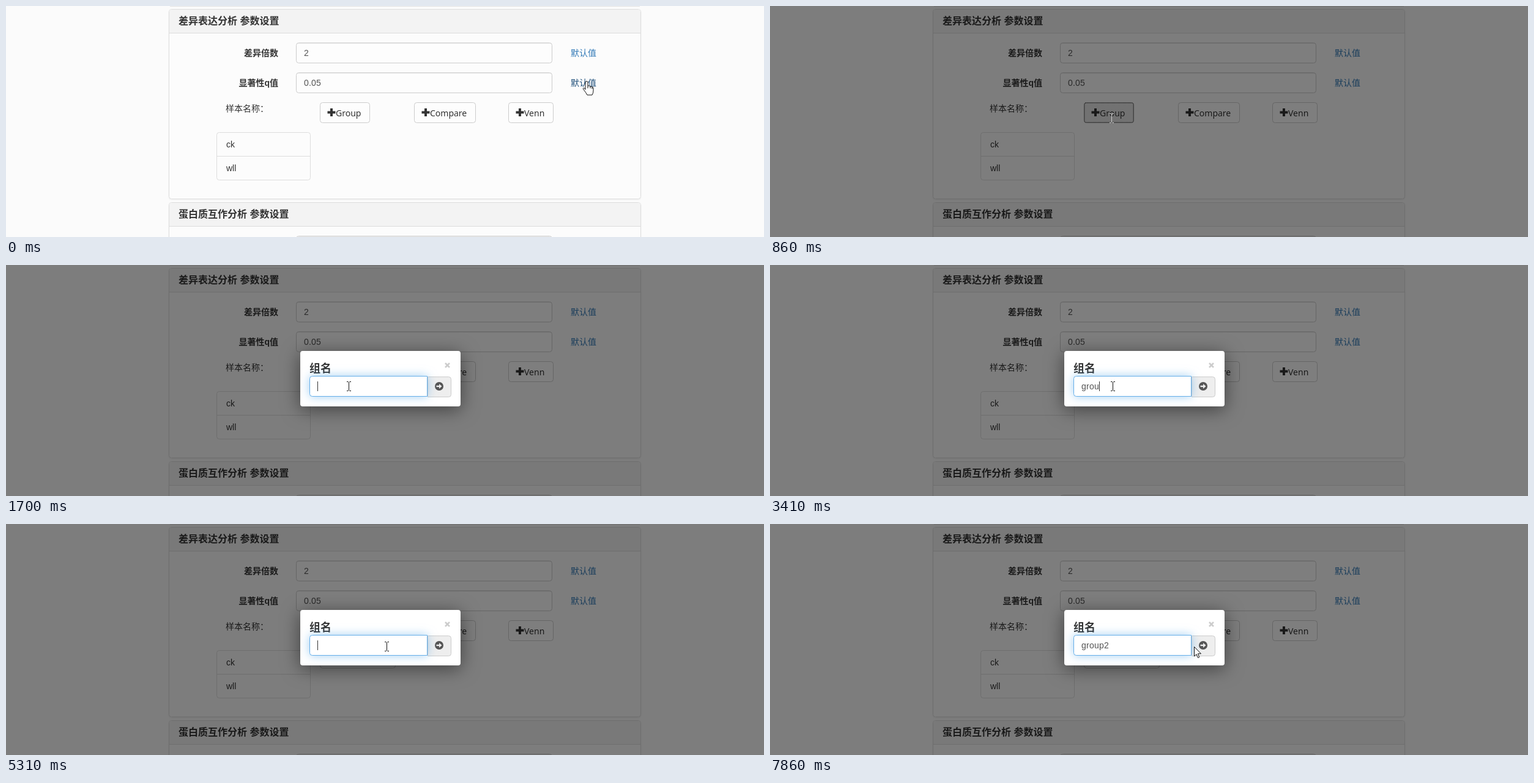
An HTML page that plays this animation: 1239 by 379 pixels, repeating every 8 s.

```html
<!DOCTYPE html>
<html lang="zh-CN">
<head>
<meta charset="utf-8">
<title>参数设置</title>
<style>
  html, body { margin: 0; width: 100%; height: 100%; overflow: hidden; background: #fbfbfb; }
  svg { display: block; width: 100%; height: 100%; }
  text { font: 14px "Liberation Sans", "Noto Sans CJK SC", "Noto Sans CJK", sans-serif; fill: #333; white-space: pre; }
  .heading { font-size: 16px; font-weight: 700; }
  .label { font-weight: 700; text-anchor: end; }
  .link { fill: #337ab7; }
  .link.hover { fill: #23527c; }
  .value { fill: #555; letter-spacing: .22px; }
  .button text { font-family: "Noto Sans", sans-serif; }
  .button rect, .field { fill: #fdfdfd; stroke: #ccc; }
  .button path { stroke: #333; stroke-width: 4; }
  .button .focus { fill: none; stroke: none; }
  .button.hover .face { fill: #e6e6e6; stroke: #adadad; }
  .button.focused .focus { stroke: #222; stroke-dasharray: 1 1; }
  .button.pressed .face { fill: #d4d4d4; stroke: #8c8c8c; }
  .panel { fill: #fcfcfc; stroke: #ddd; filter: drop-shadow(0 1px 1px rgba(0,0,0,.05)); }
  .list { fill: none; stroke: #ddd; }
  #dialog .frame { fill: #fff; filter: drop-shadow(0 5px 15px rgba(0,0,0,.5)); }
  #dialog .title { font-size: 18px; font-weight: 700; }
  #entry { fill: #fff; stroke: #ccc; }
  #entry.focused { stroke: #66afe9; filter: drop-shadow(0 0 8px rgba(102,175,233,.6)); }
</style>
</head>
<body>
<svg viewBox="0 0 1239 379" preserveAspectRatio="none">
  <defs>
    <g id="hand" stroke="#111" fill="#fff" stroke-linejoin="round">
      <path d="M-2 14V2Q-2 .5 0 .5T2 2V8Q5 7.300 6 9Q8 8.300 9 10Q11 9.500 11 12V16Q11 20 9 23H1Q-1 19-5 14Q-6.500 12-5 11.500T-2 14Z"/>
      <path d="M2 8V12M6 9V12M9 10V13" fill="none"/>
    </g>
    <path id="arrow" d="M.5.5V16L4 12.600 6.500 18.500 8.800 17.500 6.400 11.800H11.500Z" fill="#fff" stroke="#111"/>
    <path id="beam" d="M-3-7.500H-.5M1.500-7.500H4M.5-7V7M-3 7.500H-.5M1.500 7.500H4" fill="none"/>
  </defs>

  <rect width="1239" height="379" fill="#fbfbfb"/>
  <path d="M268 .5H1036" stroke="#e2e2e2"/>
  <g id="page"></g>
  <g class="list">
    <rect x="344.500" y="207.500" width="153" height="78" rx="4"/>
    <path d="M345 246.500H497"/>
  </g>
  <text x="360" y="232">ck</text>
  <text x="360" y="271">wll</text>
  <rect id="groupBox" class="field" x="513.500" y="203.500" width="123" height="33" rx="4"/>
  <rect id="shade" width="1239" height="379" opacity=".5"/>

  <g id="dialog">
    <rect class="frame" x="481" y="141" width="262" height="91" rx="4"/>
    <text class="title" x="496" y="176">组名</text>
    <path d="M718 161L725 168M725 161L718 168" stroke="#ccc" stroke-width="2.600"/>
    <path d="M689.500 183.500H723.500Q727.500 183.500 727.500 187.500V212.500Q727.500 216.500 723.500 216.500H689.500Z" fill="#eee" stroke="#ccc"/>
    <circle cx="708" cy="199" r="7" fill="#555"/>
    <path d="M703.500 199H709" stroke="#eee" stroke-width="2.400"/>
    <path d="M708 195V203L712.500 199Z" fill="#eee"/>
    <path id="entry" d="M688.500 182.500H500.500Q496.500 182.500 496.500 186.500V211.500Q496.500 215.500 500.500 215.500H688.500Z"/>
    <text id="typed" class="value" x="509" y="204"></text>
    <rect id="caret" y="191" width="1" height="16" fill="#333"/>
  </g>
  <use id="cursor"/>
</svg>
<script>
const $ = id => document.getElementById(id);

const panel = (y, height, title) => `
  <rect class="panel" x="266.5" y="${y + .5}" width="771" height="${height}" rx="4"/>
  <path d="M267 ${y + 39}V${y + 4}Q267 ${y + 1} 270 ${y + 1}H1034Q1037 ${y + 1} 1037 ${y + 4}V${y + 39}Z" fill="#f3f3f3"/>
  <path d="M267 ${y + 39.5}H1037" stroke="#ddd"/>
  <text class="heading" x="282" y="${y + 25}">${title}</text>`;

const field = y => `
  <rect class="field" x="474.5" y="${y + .5}" width="418" height="33" rx="4"/>
  <path d="M477 ${y + 1.5}H890" stroke="#000" stroke-opacity=".06"/>`;

const row = (y, label, value, id) => `${field(y)}
  <text class="label" x="445" y="${y + 22}">${label}</text>
  <text class="value" x="487" y="${y + 22}">${value}</text>
  <text class="link" id="${id}" x="923" y="${y + 22}">默认值</text>`;

const button = (x, width, name) => `
  <g class="button" id="${name}">
    <rect class="face" x="${x + .5}" y="158.5" width="${width - 1}" height="33" rx="4"/>
    <rect class="focus" x="${x + 1}" y="159" width="${width - 2}" height="32" rx="2"/>
    <path d="M${x + 12.5} 174.500h13M${x + 19} 168v13"/>
    <text x="${x + 26}" y="181">${name}</text>
  </g>`;

$('page').innerHTML =
  panel(5, 311, '差异表达分析 参数设置') +
  row(60, '差异倍数', '2', 'foldLink') +
  row(109, '显著性q值', '0.05', 'qLink') +
  '<text x="359" y="173">样本名称：</text>' +
  button(513, 82, 'Group') + button(667, 101, 'Compare') + button(821, 74, 'Venn') +
  panel(322, 100, '蛋白质互作分析 参数设置') + field(377);

// Each step changes part of the state and holds until the next one.
const DURATION = 8000;
const steps = [
  [0, { cursor: 'hand', x: 949, y: 123, ink: '#111', link: true, button: '', shade: false,
        dialog: false, lift: 0, focus: false, caret: false, text: '', added: false }],
  [210, { cursor: 'arrow', x: 582, y: 200, link: false }],
  [430, { cursor: 'hand', x: 554, y: 176, button: 'hover' }],
  [640, { button: 'hover focused pressed' }],
  [860, { cursor: 'beam', x: 558, y: 184, ink: '#ccc', button: 'hover focused', shade: true }],
  [1070, { cursor: 'arrow', y: 176, dialog: true, lift: -5 }],
  [1280, { lift: 0 }],
  [1490, { cursor: 'beam', x: 560, y: 199, ink: '#111', focus: true }],
  [1700, { caret: true }],
  [2130, { caret: false }],
  [2560, { caret: true, text: 'g' }],
  [2990, { text: 'gr' }],
  [3200, { text: 'gro' }],
  [3410, { text: 'grou' }],
  [3620, { text: 'group' }],
  [3830, { text: 'group1' }],
  [4260, { caret: false, x: 632, y: 201 }],
  [4470, { cursor: 'hand', x: 712, y: 200 }],
  [4680, { focus: false }],
  [4890, { text: '', added: true }],
  [5100, { cursor: 'beam', x: 622, y: 201 }],
  [5310, { focus: true, caret: true }],
  [5740, { caret: false }],
  [6170, { caret: true, text: 'g' }],
  [6380, { text: 'gr' }],
  [6590, { text: 'grou' }],
  [6800, { text: 'group' }],
  [7010, { text: 'group2' }],
  [7440, { caret: false }],
  [7650, { x: 660 }],
  [7860, { cursor: 'arrow', x: 693, y: 201 }],
];

const show = (id, visible) => $(id).setAttribute('visibility', visible ? 'visible' : 'hidden');

function draw(time) {
  const s = Object.assign({}, ...steps.filter(([start]) => start <= time).map(step => step[1]));
  $('qLink').classList.toggle('hover', s.link);
  $('Group').setAttribute('class', 'button ' + s.button);
  show('shade', s.shade);
  show('groupBox', s.added);
  $('dialog').style.display = s.dialog ? '' : 'none';
  $('dialog').setAttribute('transform', `translate(0 ${s.lift})`);
  $('entry').classList.toggle('focused', s.focus);
  $('typed').textContent = s.text;
  $('caret').setAttribute('x', 509 + Math.round(s.text ? $('typed').getComputedTextLength() : 0));
  show('caret', s.caret);
  $('cursor').setAttribute('href', '#' + s.cursor);
  $('cursor').setAttribute('transform', `translate(${s.x} ${s.y})`);
  $('cursor').setAttribute('stroke', s.ink);
}

const begin = performance.now();
function tick() {
  draw((performance.now() - begin) % DURATION);
  requestAnimationFrame(tick);
}
tick();
</script>
</body>
</html>
```
